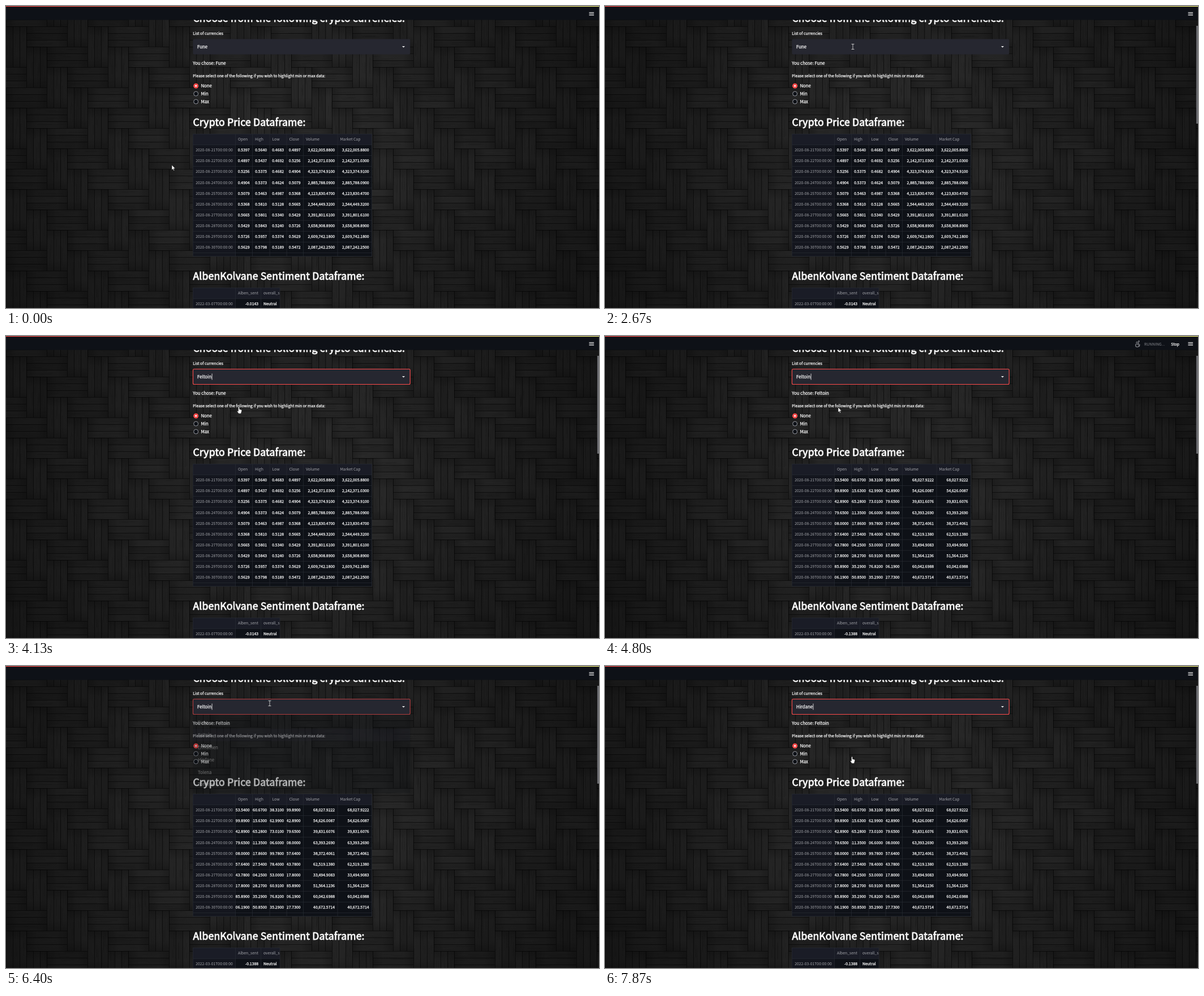
An HTML page with a canvas that plays this animation: 1048x534 px, repeating every 8 s.

```html
<!DOCTYPE html>
<html lang="en">
<head>
<meta charset="utf-8">
<title>Crypto dashboard</title>
<style>
html, body { margin: 0; width: 100%; height: 100%; overflow: hidden; background: #0e1117; }
canvas { display: block; }
</style>
</head>
<body>
<canvas id="stage" width="1048" height="534"></canvas>
<script>
const W = 1048, H = 534, LOOP = 8000, STEP = 1000 / 15;
const ctx = document.getElementById('stage').getContext('2d');
const FONT = '"Noto Sans CJK JP", "Noto Sans CJK SC", "Noto Sans CJK", "Open Sans", sans-serif';
const INK = '#fafafa', MUTED = '#a3a5aa', DARK = '#0e1117', PANEL = '#262730', RED = '#ff4b4b', GRID = '#282b33';
const SMALL = 7.64, BODY = 8.73, TITLE = 19.64;

const COINS = ['Fune', 'Feltoin', 'Ermathen', 'Hirdane', 'Tolena', 'Tordeno'];
const COLUMNS = ['Open', 'High', 'Low', 'Close', 'Volume', 'Market Cap'];
const EDGES = [405.5, 435.5, 466, 496, 525.5, 586, 646.5];

const clamp = v => Math.max(0, Math.min(1, v));
const between = (t, a, b) => t >= a && t < b;

function seeded(seed) {
  return () => (seed = seed * 16807 % 2147483647) / 2147483647;
}

// Ten days of prices as a random walk: each day opens where the last one closed
function market({ seed, price, swing, decimals, volume, spread, volumeDecimals }) {
  const random = seeded(seed);
  const money = v => (+v.toFixed(decimals)).toFixed(4);
  return Array.from({ length: 10 }, () => {
    const open = price, close = open * (1 + (random() - 0.5) * swing);
    const high = Math.max(open, close) * (1 + random() * swing / 3);
    const low = Math.min(open, close) * (1 - random() * swing / 3);
    const traded = +(volume + spread * random()).toFixed(volumeDecimals);
    const volumeText = traded.toLocaleString('en-US', { minimumFractionDigits: 4, maximumFractionDigits: 4 });
    price = close;
    return [money(open), money(high), money(low), money(close), volumeText, volumeText];
  });
}

const DATA = [
  { date: '2022-03-07', score: '-0.0143',
    rows: market({ seed: 4711, price: 0.5397, swing: 0.2, decimals: 4, volume: 1.8e6, spread: 2.6e6, volumeDecimals: 2 }) },
  { date: '2022-03-01', score: '-0.1388',
    rows: market({ seed: 9203, price: 11853.54, swing: 0.05, decimals: 2, volume: 32900, spread: 36700, volumeDecimals: 4 }) }
];

// Pointer moves: start, end, x, y
const MOVES = [
  [667, 933, 277, 282], [1067, 1533, 275, 281], [1933, 2270, 425, 3], [2270, 2667, 438, 72],
  [2867, 3533, 412, 126], [5000, 5400, 478, 68], [5867, 6200, 466, 66], [6400, 6840, 437, 161]
];

function pointer(t) {
  let x = 293, y = 281;
  for (const [start, end, toX, toY] of MOVES) {
    const k = clamp((t - start) / (end - start));
    x += (toX - x) * k;
    y += (toY - y) * k;
  }
  return { x, y };
}

// Normalise the em so that a digit is always 0.497 wide
ctx.font = `100px ${FONT}`;
const EM = 49.7 / ctx.measureText('0').width;

function text(str, x, y, size = SMALL, color = INK, { align = 'left', stroke = color === INK ? 0.25 : 0, spacing = 0 } = {}) {
  ctx.font = `${size * EM}px ${FONT}`;
  ctx.letterSpacing = spacing + 'px';
  ctx.textAlign = align;
  ctx.fillStyle = ctx.strokeStyle = color;
  ctx.fillText(str, x, y);
  if (stroke) {
    ctx.lineWidth = stroke;
    ctx.lineJoin = 'round';
    ctx.strokeText(str, x, y);
  }
}
const title = (str, y) => text(str, 330.4, y, TITLE, INK, { stroke: 0.85, spacing: 0.18 });

function rect(x, y, w, h, color, c = ctx) {
  c.fillStyle = color;
  c.fillRect(x, y, w, h);
}

function clipped(x, y, w, h, draw) {
  ctx.save();
  ctx.beginPath();
  ctx.rect(x, y, w, h);
  ctx.clip();
  draw();
  ctx.restore();
}

function shape(points, fill, stroke) {
  ctx.beginPath();
  points.forEach(([x, y]) => ctx.lineTo(x, y));
  ctx.closePath();
  ctx.fillStyle = fill;
  ctx.fill();
  if (stroke) {
    ctx.strokeStyle = stroke;
    ctx.lineWidth = 0.6;
    ctx.stroke();
  }
}

function disc(x, y, r, fill, stroke) {
  ctx.beginPath();
  ctx.arc(x, y, r, 0, Math.PI * 2);
  ctx.fillStyle = fill;
  ctx.fill();
  if (stroke) {
    ctx.strokeStyle = stroke;
    ctx.lineWidth = 1;
    ctx.stroke();
  }
}

// Dark wooden weave: bundles of three planks in a stair pattern
function makeWeave() {
  const canvas = document.createElement('canvas');
  canvas.width = W;
  canvas.height = H;
  const c = canvas.getContext('2d'), cell = 36, plank = cell / 3;
  const random = seeded(7);
  const grey = (v, a = 1) => `rgba(${v | 0},${v | 0},${v | 0},${a})`;

  function bundle(x, y, vertical) {
    c.save();
    c.translate(x, y);
    if (vertical) c.transform(0, 1, 1, 0, 0, 0);
    for (let n = 0; n < 3; n++) {
      const base = 35 + random() * 7, top = n * plank;
      const shade = c.createLinearGradient(0, 0, cell * 2, 0);
      shade.addColorStop(0, grey(base * 0.8));
      shade.addColorStop(0.25, grey(base));
      shade.addColorStop(0.75, grey(base));
      shade.addColorStop(1, grey(base * 0.8));
      rect(0, top, cell * 2, plank, shade, c);
      for (let g = 0; g < 6; g++) {
        rect(random() * 40, top + random() * plank, 12 + random() * 20, 0.6, grey(random() < 0.6 ? 14 : 70, 0.18), c);
      }
      rect(0, top, cell * 2, 0.9, grey(8, 0.7), c);
    }
    rect(0, 0, 1, cell, grey(5, 0.7), c);
    c.restore();
  }

  for (let j = -2; j < 16; j++) {
    for (let i = -2; i < 30; i++) {
      const phase = (i - j + 40) % 4;
      if (phase === 0) bundle(i * cell, j * cell, false);
      if (phase === 3) bundle(i * cell, j * cell, true);
    }
  }
  const vignette = c.createRadialGradient(W / 2, H / 2, 120, W / 2, H / 2, 640);
  vignette.addColorStop(0, grey(0, 0));
  vignette.addColorStop(1, grey(0, 0.5));
  rect(0, 0, W, H, vignette, c);
  return canvas;
}
const weave = makeWeave();

function tableFrame(y, height, edges) {
  const left = 330.5, width = edges.at(-1) - left;
  rect(left, y, width, height, DARK);
  rect(left, y, 75, height, '#14161e');
  rect(left, y, width, 19.3, '#1a1c26');
  for (const x of [left, ...edges]) rect(x - 0.3, y, 0.7, height, GRID);
  for (let line = y; line < y + height; line += 19.1) rect(left, line, width, 0.7, GRID);
  rect(left, y + height - 0.7, width, 0.7, GRID);
}

function priceTable(rows) {
  tableFrame(226, 217, EDGES);
  COLUMNS.forEach((name, i) => text(name, EDGES[i] + 4.5, 238.3, SMALL, MUTED));
  rows.forEach((row, r) => {
    const y = 257.2 + r * 19.1;
    text(`2020-08-${21 + r}T00:00:00`, 335.2, y, SMALL, MUTED);
    row.forEach((value, i) => {
      const left = EDGES[i], right = EDGES[i + 1];
      clipped(left + 0.3, y - 10, right - left, 16, () =>
        text(value, right - 5, y, SMALL, INK, { align: 'right' }));
    });
  });
}

function sentimentTable({ date, score }) {
  tableFrame(498, 40, [405.5, 450.5, 484]);
  text('Alben_sent', 410, 510.3, SMALL, MUTED);
  clipped(450, 498, 33.5, 20, () => text('overall_sent', 455, 510.3, SMALL, MUTED));
  text(date + 'T00:00:00', 335.2, 529.2, SMALL, MUTED);
  text(score, 446, 529.2, SMALL, INK, { align: 'right' });
  text('Neutral', 455, 529.2);
}

function selectBox(coin, border, caret) {
  ctx.beginPath();
  ctx.roundRect(330.5, 58.5, 383.7, 27, 2);
  ctx.fillStyle = PANEL;
  ctx.fill();
  if (border) {
    ctx.globalAlpha = border;
    ctx.strokeStyle = RED;
    ctx.lineWidth = 1.1;
    ctx.stroke();
    ctx.globalAlpha = 1;
  }
  text(coin, 338, 75, BODY);
  if (caret) rect(338 + ctx.measureText(coin).width + 0.5, 66.5, 0.8, 11, INK);
  shape([[700, 71], [705, 71], [702.5, 73.6]], INK);
}

function radios() {
  ['None', 'Min', 'Max'].forEach((label, i) => {
    const y = 141.2 + i * 13.95;
    if (i) disc(335.7, y, 4, DARK, '#9799a0');
    else {
      disc(335.7, y, 4.5, RED);
      disc(335.7, y, 1.6, INK);
    }
    text(label, 344.4, y + 3, BODY);
  });
}

const hoverRow = (t, selected) => {
  const { y } = pointer(t);
  return y > 89 ? Math.floor((y - 89) / 21.85) : selected;
};

function dropdown(t, opacity, selected) {
  ctx.save();
  ctx.globalAlpha = opacity;
  ctx.shadowColor = 'rgba(0,0,0,.3)';
  ctx.shadowBlur = 9;
  ctx.shadowOffsetY = 2;
  rect(330.3, 86, 384, 138.5, DARK);
  ctx.shadowColor = 'transparent';
  COINS.forEach((coin, i) => {
    const y = 89.2 + i * 21.85;
    let glow = 0;
    for (let back = 0; back < 140; back += 20) glow += (hoverRow(t - back, selected) === i) / 7;
    ctx.globalAlpha = opacity * glow;
    rect(330.3, y, 384, 21.85, PANEL);
    ctx.globalAlpha = opacity;
    text(coin, 339, y + 14, BODY);
  });
  ctx.restore();
}

function runningStatus(t) {
  const color = '#85878d', lean = Math.sin(t / 90) * 0.6;
  disc(943.5, 9.2, 1.3, color);
  ctx.strokeStyle = color;
  ctx.lineWidth = 1.2;
  ctx.beginPath();
  ctx.moveTo(938.5, 12 + lean);
  ctx.lineTo(940, 10.5);
  ctx.lineTo(943.3, 12);
  ctx.lineTo(941.5, 15);
  ctx.lineTo(945, 15.2);
  ctx.lineTo(944.4, 18.8 - lean);
  ctx.stroke();
  ctx.beginPath();
  ctx.arc(940.6, 16.6, 2.9, 0, 5);
  ctx.stroke();
  text('RUNNING...', 953, 16.6, SMALL, color);
  text('Stop', 1000.3, 16.6);
}

function header(t) {
  rect(0, 0, W, 24.6, DARK);
  const stripe = ctx.createLinearGradient(0, 0, W, 0);
  stripe.addColorStop(0, RED);
  stripe.addColorStop(1, '#fffd80');
  rect(0, 0, W, 1.1, stripe);
  for (let i = 0; i < 3; i++) rect(1030.5, 11 + i * 2.4, 8.6, 1, INK);
  if (between(t, 4530, 5330)) runningStatus(t);
}

function cursor({ x, y }, kind) {
  ctx.save();
  ctx.translate(x, y);
  if (kind === 'text') {
    for (const end of [-5, 4.2]) rect(-2.5, end, 5, 0.8, '#e4e4e4');
    rect(-0.4, -5, 0.8, 10, '#e4e4e4');
  } else if (kind === 'hand') {
    shape([[-1.6, 0], [-0.3, -0.8], [0.6, 0], [0.6, 3.5], [3.6, 4.2], [4.9, 5.4], [3.4, 11.2],
      [-0.8, 11.2], [-3.6, 7.2], [-3.2, 6.1], [-1.6, 7.2]], '#fff', '#111');
  } else {
    shape([[0, 0], [0, 9], [2, 7.2], [3.3, 10.2], [4.7, 9.6], [3.4, 6.7], [6.1, 6.5]], '#fff', '#111');
  }
  ctx.restore();
}

function draw(now) {
  const t = Math.floor((now % LOOP + 4) / STEP) * STEP;
  const mouse = pointer(t);
  const chosen = t >= 7860 ? 3 : t >= 4120 ? 1 : 0;
  const data = t >= 4660 ? 1 : 0;
  const open = between(t, 2920, 4120) ? clamp((t - 2880) / 200)
    : between(t, 6390, 7860) ? clamp((t - 6350) / 200) : 0;
  const border = t < 5860 ? clamp((t - 2867) / 100)
    : Math.max(clamp((6067 - t) / 250), clamp((t - 6300) / 150));
  const blinkStart = t < 6390 ? 4735 : 7195;
  const caret = chosen > 0 && (t < blinkStart || (t - blinkStart) % 530 < 265);

  ctx.drawImage(weave, 0, 0);
  title('Choose from the following crypto currencies:', 28.2);
  text('List of currencies', 330.3, 50.7);
  selectBox(COINS[chosen], border, caret);
  text('You chose: ' + COINS[data], 330.3, 104.2, BODY);
  text('Please select one of the following if you wish to highlight min or max data:', 330.3, 126);
  radios();
  title('Crypto Price Dataframe:', 212);
  priceTable(DATA[data].rows);
  title('AlbenKolvane Sentiment Dataframe:', 484);
  sentimentTable(DATA[data]);
  if (open) dropdown(t, open, chosen);

  const overList = open && mouse.y > 86;
  if (t >= 730 && mouse.y > 25 && !overList) rect(1044.8, 35, 3.2, 173, '#6b6c70');
  header(t);

  const onSelect = mouse.x > 330 && between(mouse.y, 48, 86);
  const hand = overList || between(t, 4120, 4530) || t >= 7860;
  cursor(mouse, hand ? 'hand' : onSelect ? 'text' : 'arrow');
}

function tick() {
  draw(performance.now());
  requestAnimationFrame(tick);
}
tick();
</script>
</body>
</html>
```
